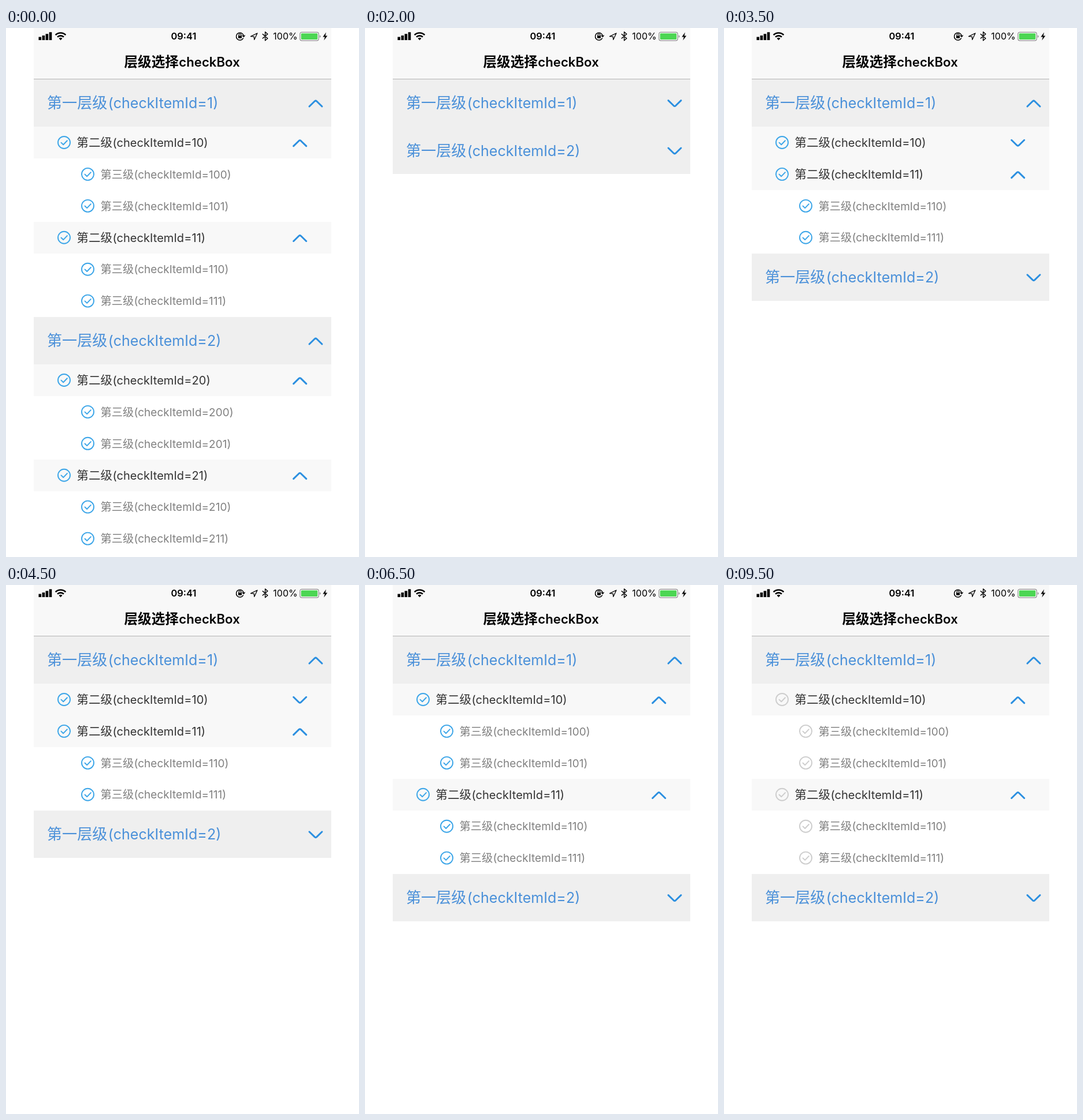
Animation, 611 px wide and 917 px high, one loop 10000 ms. Source, as an HTML page:

```html
<!DOCTYPE html>
<html lang="zh-CN">
<head>
<meta charset="utf-8">
<style>
  html, body { margin: 0; width: 100%; height: 100%; overflow: hidden; background: #fff; }
  svg { display: block; width: 611px; height: 917px; }
  text { font-family: Inter, "Noto Sans CJK SC", "Noto Sans CJK", sans-serif; white-space: pre; }
  .cjk { font-family: "Noto Sans CJK SC", "Noto Sans CJK", sans-serif; }
  .bold { font-weight: 600; }
  .line { fill: none; stroke-linecap: round; stroke-linejoin: round; }
</style>
</head>
<body>
<svg viewBox="0 0 611 917">
  <rect x="48" width="515" height="88" fill="#f8f8f8"/>
  <g id="list"></g>
  <rect x="48" y="88" width="515" height="1" fill="#b4b4b4"/>

  <path d="M56.5 15.5h4.6V21h-4.6zM62.6 13h4.6v8h-4.6zM68.6 10.3h4.6V21h-4.6zM74.7 7.3h4.6V21h-4.6z"/>
  <g class="line" stroke="#000" stroke-width="2.7" style="stroke-linecap:butt">
    <path d="M85.7 12.1a12.6 12.6 0 0 1 17.6 0M89 15.6a7.9 7.9 0 0 1 11 0"/>
  </g>
  <path d="M94.5 21.3l-3-3.2a4.4 4.4 0 0 1 6 0z"/>
  <text class="bold" x="307.5" y="20.4" font-size="16.5" text-anchor="middle">09:41</text>

  <g class="line" stroke="#000" stroke-width="1.5">
    <path d="M410.5 17.8a6.4 6.4 0 1 1 .8-3.8M409.4 13.4l2 1.9 1.8-2.2"/>
    <path d="M403 13.5v-1.4a2 2 0 0 1 4 0v1.4" stroke-width="1.2"/>
    <path d="M423.5 14.6L435 9l-5.2 11.3-.6-5.4z" stroke-width="1.3"/>
    <path d="M444.3 10.6l8.6 7.4-4.3 3.8V6.7l4.3 3.8-8.6 7.4" stroke-width="1.4"/>
  </g>
  <rect x="402" y="13.2" width="6" height="4.6" rx=".6"/>
  <text x="462.3" y="20.4" font-size="16">100%</text>
  <rect x="508.8" y="7.4" width="32.4" height="14.4" rx="3" fill="#fff" stroke="#8e8e8e" stroke-width="1.2"/>
  <rect x="510.7" y="9.3" width="28.6" height="10.6" rx="1.4" fill="#4cd653"/>
  <path d="M542.8 12.2q1.8.6 1.8 2.4t-1.8 2.4z" fill="#8e8e8e"/>
  <path d="M554 7.6l-5.6 7.8h3.5l-1.6 6 6-8h-3.6z"/>

  <text class="cjk bold" x="204.5" y="67" font-size="23.6">层级选择</text>
  <text class="bold" x="299.3" y="66.6" font-size="22.2">checkBox</text>
</svg>
<script>
const ROW = 54.93, HEAD = 82.4, TOP = 88.6, STEP = 500;
const list = document.getElementById('list');

const LEVELS = [
  { name: '第一层级', x: 71, latinX: 176.8, size: 26.1, latin: 25.1, color: '#4a90d9', bg: '#efefef', h: HEAD, base: 9.3, arrow: 536 },
  { name: '第二级', x: 122.3, latinX: 184.4, size: 20.6, latin: 20.1, color: '#333', bg: '#f8f8f8', h: ROW, base: 7.7, arrow: 508.7, check: 100.5 },
  { name: '第三级', x: 163.4, latinX: 221.5, size: 19.3, latin: 19, color: '#808080', h: ROW, base: 7.2, check: 141.5 }
];

// Open nodes, and whether the boxes are ticked, from each step on
const SCENES = [
  [0, '1 10 11 2 20 21', true],
  [3, '', true],
  [5, '1 10 11', true],
  [7, '1 11', true],
  [8, '1', true],
  [9, '1 11', true],
  [10, '1 10 11', true],
  [16, '', true],
  [17, '1 10 11', true],
  [18, '1 10 11', false]
];

function row(id, y, open, ticked) {
  const L = LEVELS[id.length - 1], mid = y + L.h / 2, base = mid + L.base;
  const top = Math.round(y), bottom = Math.round(y + L.h);
  let s = '';
  if (L.bg) s += `<rect x="48" y="${top}" width="515" height="${bottom - top}" fill="${L.bg}"/>`;
  s += `<g fill="${L.color}"><text class="cjk" x="${L.x}" y="${base}" font-size="${L.size}">${L.name}</text>` +
    `<text x="${L.latinX}" y="${base}" font-size="${L.latin}">(checkItemId=${id})</text></g>`;
  if (L.check) s += `<g class="line" transform="translate(${L.check} ${mid})" stroke="${ticked ? '#3ba5e8' : '#cdcdcd'}" stroke-width="1.9">` +
    '<circle r="10.5"/><path d="M-5 .2L-1.3 3.8 5.4-3.2"/></g>';
  if (L.arrow) s += `<path class="line" transform="translate(${L.arrow} ${mid + 1}) scale(1 ${open ? 1 : -1})" stroke="#2b8fe0" stroke-width="3" ` +
    'd="M-11 5.2L-1.6-4Q0-5.4 1.6-4L11 5.2"/>';
  return s;
}

function draw([, openIds, ticked]) {
  const open = new Set(openIds.split(' '));
  let y = TOP, out = '';
  const add = id => {
    out += row(id, y, open.has(id), ticked);
    y += LEVELS[id.length - 1].h;
    if (open.has(id)) for (const n of [0, 1]) add(id + n);
  };
  add('1');
  add('2');
  list.innerHTML = out;
}

let shown;
function tick() {
  const step = Math.floor(performance.now() % 10000 / STEP);
  const scene = SCENES.findLast(s => s[0] <= step);
  if (scene !== shown) draw(shown = scene);
  requestAnimationFrame(tick);
}
tick();
</script>
</body>
</html>
```
